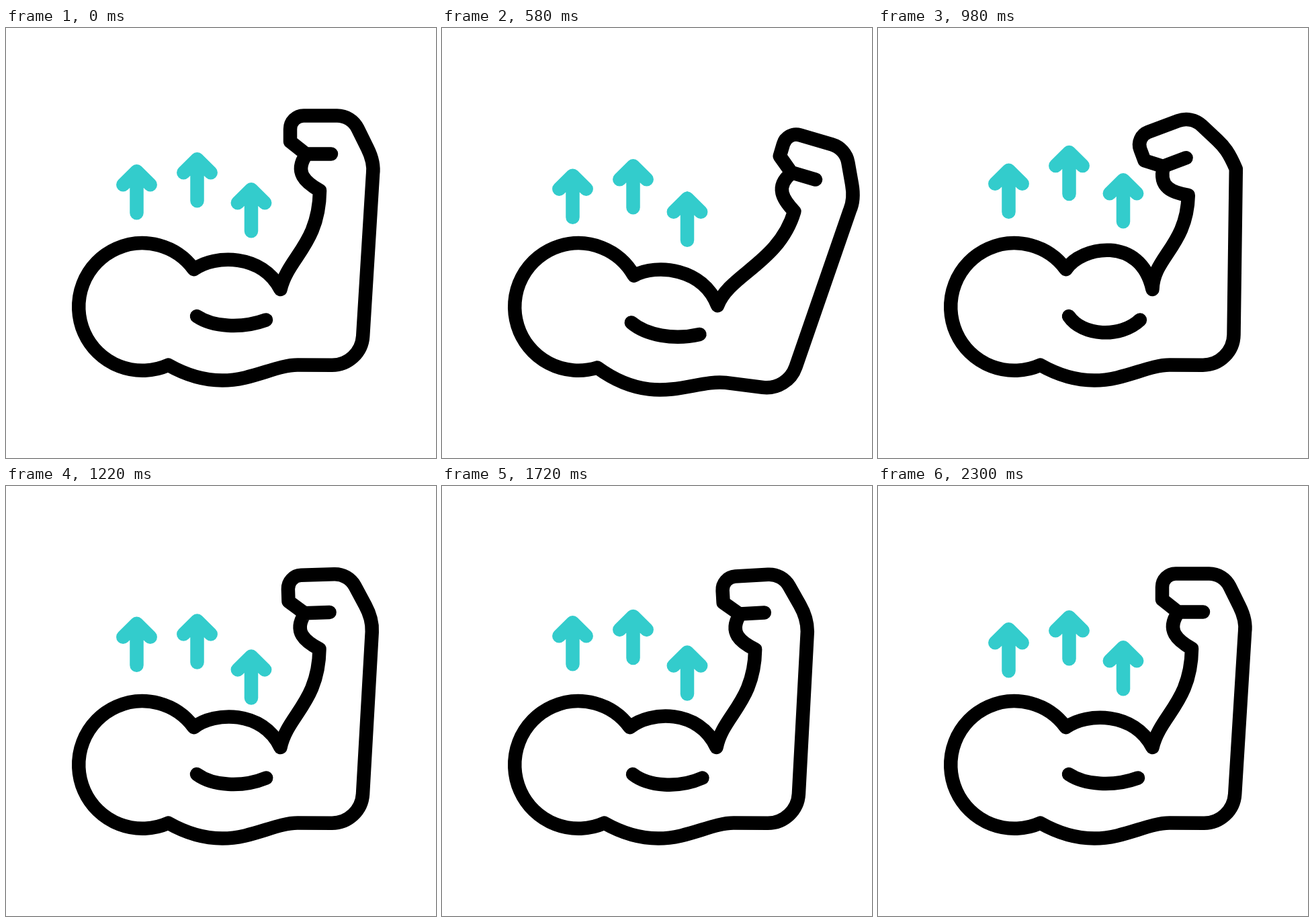
Write an HTML page with a canvas that moves like this. It is 640 by 640 pixels and loops after 2.4 s.

```html
<!DOCTYPE html>
<html lang="en">
<head>
<meta charset="utf-8">
<title>Flexing arm</title>
<style>
html, body { margin: 0; width: 100%; height: 100%; overflow: hidden; background: #fff; }
canvas { display: block; }
</style>
</head>
<body>
<canvas id="stage" width="640" height="640"></canvas>
<script>
const ctx = document.getElementById('stage').getContext('2d');
const LOOP = 2400;

// Skeleton: three joints, and how far each turns (degrees) in each pose.
const shoulder = [203, 415], elbow = [523, 481], wrist = [484, 234];
const joints = [shoulder, elbow, wrist];
const SHOULDER_RADIUS = 94.8;
const poses = {
  rest: { turns: [0, 0, 0], flex: 0 },
  open: { turns: [7, 9.5, 0.5], flex: 0 },
  flexed: { turns: [0, -3, -25], flex: 1 }
};

function turn([x, y], [px, py], degrees) {
  const a = degrees * Math.PI / 180, c = Math.cos(a), s = Math.sin(a);
  return [px + (x - px) * c - (y - py) * s, py + (x - px) * s + (y - py) * c];
}

// A point of the resting arm, carried into every pose. Bone 0 is the upper arm,
// 1 the forearm, 2 the hand; fractions lie between. dx, dy is the muscle bulge.
function point(x, y, bone = 0, dx = 0, dy = 0) {
  const place = ({ turns, flex }) => {
    let p = [x + dx * flex, y + dy * flex];
    for (let k = 2; k >= 0; k--) {
      const share = Math.min(1, Math.max(0, bone - k + 1));
      p = turn(p, joints[k], turns[k] * share);
    }
    return p;
  };
  return { rest: place(poses.rest), open: place(poses.open), flexed: place(poses.flexed) };
}

const line = p => ({ points: [p] });
const corner = (p, radius) => ({ points: [p], radius });
const curve = (a, b, c) => ({ points: [a, b, c] });
const hand = (x, y) => point(x, y, 2);

const armStart = point(280, 359);
const armEnd = point(241.6, 501.6);
const outline = [
  curve(point(311, 337, 0, -12, -17), point(381, 336, 0, 13, -38), point(408.5, 389)),
  curve(point(420, 341, 0, -14, 0), point(466, 322, 1), hand(467, 242)),
  curve(hand(446, 230), hand(428, 215), hand(447, 188)),
  line(hand(423, 169)),
  corner(hand(423, 130.5), 20),
  corner(hand(514, 130.5), 34),
  line(hand(538, 179)),
  curve(hand(544, 191), hand(548, 203), point(546, 218, 1.4)),
  corner(point(528.5, 502, 0.5), 46),
  line(point(434, 501.5)),
  curve(point(402, 501.5), point(366, 524.5), point(322, 524.5)),
  curve(point(293, 524.5), point(267, 516), armEnd)
];
const thumbStart = hand(447, 187.5);
const thumb = [line(hand(484, 187.5))];
const creaseStart = point(284, 429);
const crease = [curve(point(308, 445, 0, -5, 19), point(350, 448, 0, 15, 19), point(387, 434.5, 0, 4, 0))];

// Keys: time, then values. Arm values are the shares of the open and flexed poses.
const armKeys = [[100, 0, 0], [600, 1, 0], [900, 0, 1], [1200, 0, 0], [1500, 0, 1], [1800, 0, 0]];
const arrowKeys = [[100, 0], [600, 14], [960, -17], [1200, 16], [1440, -17], [1800, 14], [2100, 0]];
const arrows = [{ x: 365, y: 240.3 }, { x: 284.5, y: 195.3 }, { x: 194.5, y: 213.3 }];
const ARROW_DELAY = 100;

const easeIn = u => u * u * (2 - u);

// Linear between keys, eased only at the very start and end.
function sample(keys, t) {
  const last = keys.length - 1;
  if (t <= keys[0][0]) return keys[0].slice(1);
  if (t >= keys[last][0]) return keys[last].slice(1);
  const i = keys.findIndex(key => key[0] > t);
  const from = keys[i - 1], to = keys[i];
  let u = (t - from[0]) / (to[0] - from[0]);
  if (i === 1) u = easeIn(u);
  else if (i === last) u = 1 - easeIn(1 - u);
  return from.slice(1).map((v, k) => v + (to[k + 1] - v) * u);
}

const blend = ({ rest, open, flexed }, [o, f]) =>
  rest.map((v, i) => v + (open[i] - v) * o + (flexed[i] - v) * f);

function trace(start, segments, mix) {
  ctx.moveTo(...blend(start, mix));
  segments.forEach(({ points, radius }, i) => {
    const p = points.flatMap(q => blend(q, mix));
    if (radius) ctx.arcTo(...p, ...blend(segments[i + 1].points[0], mix), radius);
    else if (points.length === 3) ctx.bezierCurveTo(...p);
    else ctx.lineTo(...p);
  });
}

function drawArm(mix) {
  const shoulderAngle = p => {
    const [x, y] = blend(p, mix);
    return Math.atan2(y - shoulder[1], x - shoulder[0]);
  };
  ctx.strokeStyle = '#000';
  ctx.beginPath();
  trace(armStart, outline, mix);
  ctx.arc(...shoulder, SHOULDER_RADIUS, shoulderAngle(armEnd), shoulderAngle(armStart));
  ctx.closePath();
  trace(thumbStart, thumb, mix);
  trace(creaseStart, crease, mix);
  ctx.stroke();
}

function drawArrow(x, y) {
  ctx.strokeStyle = '#33cccc';
  ctx.beginPath();
  ctx.moveTo(x - 20.2, y + 20);
  ctx.lineTo(x, y);
  ctx.lineTo(x + 20.2, y + 20);
  ctx.moveTo(x, y);
  ctx.lineTo(x, y + 62);
  ctx.stroke();
}

function draw(now) {
  const t = now % LOOP;
  ctx.fillStyle = '#fff';
  ctx.fillRect(0, 0, 640, 640);
  ctx.lineWidth = 20.5;
  ctx.lineCap = ctx.lineJoin = 'round';
  drawArm(sample(armKeys, t));
  arrows.forEach(({ x, y }, i) => drawArrow(x, y + sample(arrowKeys, t - i * ARROW_DELAY)[0]));
}

const start = performance.now();
(function tick() {
  draw(performance.now() - start);
  requestAnimationFrame(tick);
})();
</script>
</body>
</html>
```
